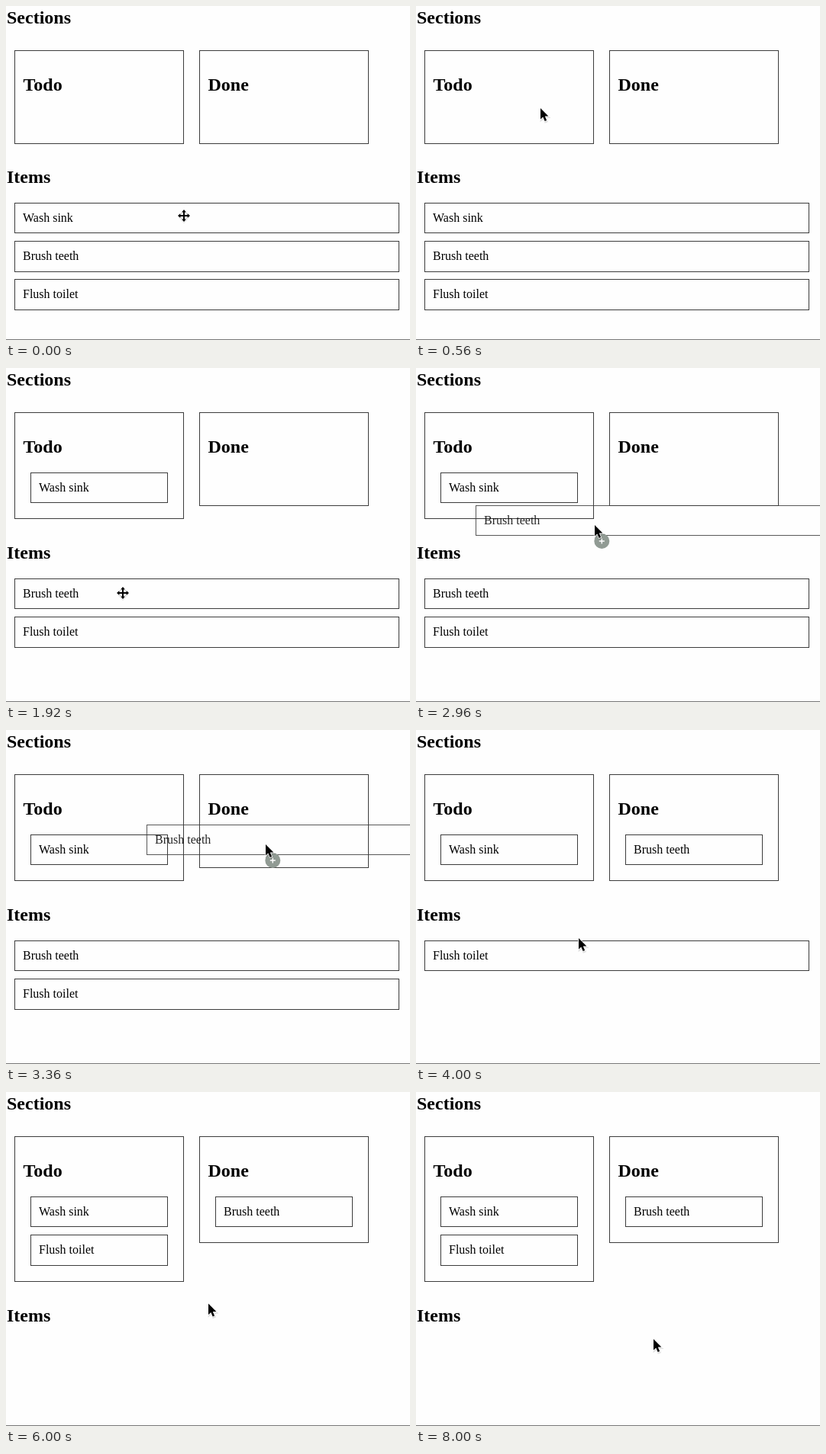
These frames come from a looping animation (529x438 px, 8.64 s). An HTML page:

```html
<!DOCTYPE html>
<html lang="en">
<head>
<meta charset="utf-8">
<title>Drag and drop lists</title>
<style>
  html, body { margin: 0; width: 100%; height: 100%; overflow: hidden; background: #fefefe; }
  svg { display: block; width: 529px; height: 438px; }
  text { font: 16px "Liberation Serif", Times, serif; fill: #000; }
  .heading { font-size: 24px; font-weight: bold; }
  .box { fill: none; stroke: #3c3c3c; stroke-width: 1; }
</style>
</head>
<body>
<svg id="stage" viewBox="0 0 529 438"></svg>
<script>
const LOOP = 8640, STEP = 80;
const stage = document.getElementById('stage');

// Each task is dragged from the list, then lands in a section.
const tasks = [
  { label: 'Wash sink', section: 0, grab: [233, 275], start: 80, release: 560, drop: 640 },
  { label: 'Brush teeth', section: 1, grab: [167, 302], start: 2800, release: 3520, drop: 3600 },
  { label: 'Flush toilet', section: 0, grab: [200, 286], start: 4640, release: 5360, drop: 5440 }
];
const sections = [{ title: 'Todo', x: 11 }, { title: 'Done', x: 253 }];

// Pointer path: time, x, y
const path = [
  [0, 233, 275], [80, 233, 275], [480, 163, 134], [960, 163, 134],
  [1840, 153, 295], [1920, 153, 295], [2240, 163, 311], [2720, 163, 311],
  [2960, 234, 206], [3280, 340, 150], [3600, 340, 150], [4000, 213, 273],
  [4320, 201, 288], [4560, 201, 288], [5040, 150, 157], [5120, 150, 161],
  [5600, 150, 161], [6160, 311, 324], [LOOP, 311, 324]
];

function pointerAt(t) {
  const i = path.findIndex(p => p[0] > t);
  const [t0, x0, y0] = path[i - 1], [t1, x1, y1] = path[i];
  const k = (t - t0) / (t1 - t0);
  return [x0 + (x1 - x0) * k, y0 + (y1 - y0) * k];
}

const text = (x, y, label, kind = '') => `<text class="${kind}" x="${x}" y="${y}">${label}</text>`;

function box(x, top, right, bottom) {
  const y = Math.round(top);
  return `<rect class="box" x="${x + .5}" y="${y + .5}" width="${right - x}" height="${Math.round(bottom) - y}"/>`;
}

function item({ label, x, y, width, opacity = 1 }) {
  return `<g opacity="${opacity}">${box(x, y, x + width, y + 39.6)}${text(x + 11, Math.round(y) + 25, label)}</g>`;
}

const ARROW = 'M0 0V14.6L3.3 11.5L5.7 17L8.1 16L5.8 10.6H10.4Z';
const MOVE = 'M0-8L3-4.6H1V-1H4.6V-3L8 0L4.6 3V1H1V4.6H3L0 8L-3 4.6H-1V1H-4.6V3L-8 0L-4.6-3V-1H-1V-4.6H-3Z';

function cursor(x, y, hovering, dragging) {
  const shape = hovering ? MOVE : ARROW;
  const shadow = hovering
    ? '<path d="M0-7L8 1L0 10L-8 1Z" fill="#000" opacity=".17"/>'
    : `<path d="${ARROW}" transform="translate(.6 1.4)" fill="#000" stroke="#000" stroke-width="2" opacity=".12"/>`;
  const badge = dragging
    ? '<circle cx="9.3" cy="21" r="10" fill="#919b94"/><path d="M5.8 21h7M9.3 17.5v7" stroke="#fff" stroke-width="1.4"/>'
    : '';
  return `<g transform="translate(${x} ${y})">${badge}${shadow}
    <path d="${shape}" fill="#000" stroke="#fff" stroke-width="1.6" paint-order="stroke"/></g>`;
}

function draw(t) {
  const [px, py] = pointerAt(t);
  const counts = [0, 0];
  const placed = [];
  for (const task of tasks.filter(k => t >= k.drop)) {
    placed.push({
      label: task.label,
      x: sections[task.section].x + 21,
      y: 136.6 + 50.4 * counts[task.section]++,
      width: 179,
      opacity: t < task.drop + STEP ? .5 : 1
    });
  }
  const bottoms = counts.map(n => [180, 197, 248][n]);
  const shift = Math.max(...bottoms) - 180;
  const listTop = 257.6 + (shift ? shift + 1 : 0);
  const headingY = 232 + (shift ? shift + 1 : 0);
  tasks.filter(k => t < k.drop).forEach((task, i) =>
    placed.push({ label: task.label, x: 11, y: listTop + 50.4 * i, width: 503 }));

  const dragged = tasks.find(k => t >= k.start && t < k.release);
  const hovering = !dragged && placed.some(p =>
    px >= p.x && px <= p.x + p.width && py >= p.y && py <= p.y + 40);

  let out = text(1, 23, 'Sections', 'heading') + text(1, headingY, 'Items', 'heading');
  sections.forEach((s, i) => {
    out += box(s.x, 58, s.x + 221, bottoms[i]) + text(s.x + 11.5, 111, s.title, 'heading');
  });
  out += placed.map(item).join('');
  out += '<path d="M0 437.5H529" stroke="#777"/>';
  if (dragged) {
    const origin = placed.find(p => p.label === dragged.label);
    out += item({
      ...origin,
      x: Math.round(origin.x + px - dragged.grab[0]),
      y: origin.y + py - dragged.grab[1],
      opacity: .85
    });
  }
  stage.innerHTML = out + cursor(px, py, hovering, dragged);
}

let shown = -1;
function tick() {
  const t = Math.floor(performance.now() % LOOP / STEP) * STEP;
  if (t !== shown) draw(shown = t);
  requestAnimationFrame(tick);
}
tick();
</script>
</body>
</html>
```
